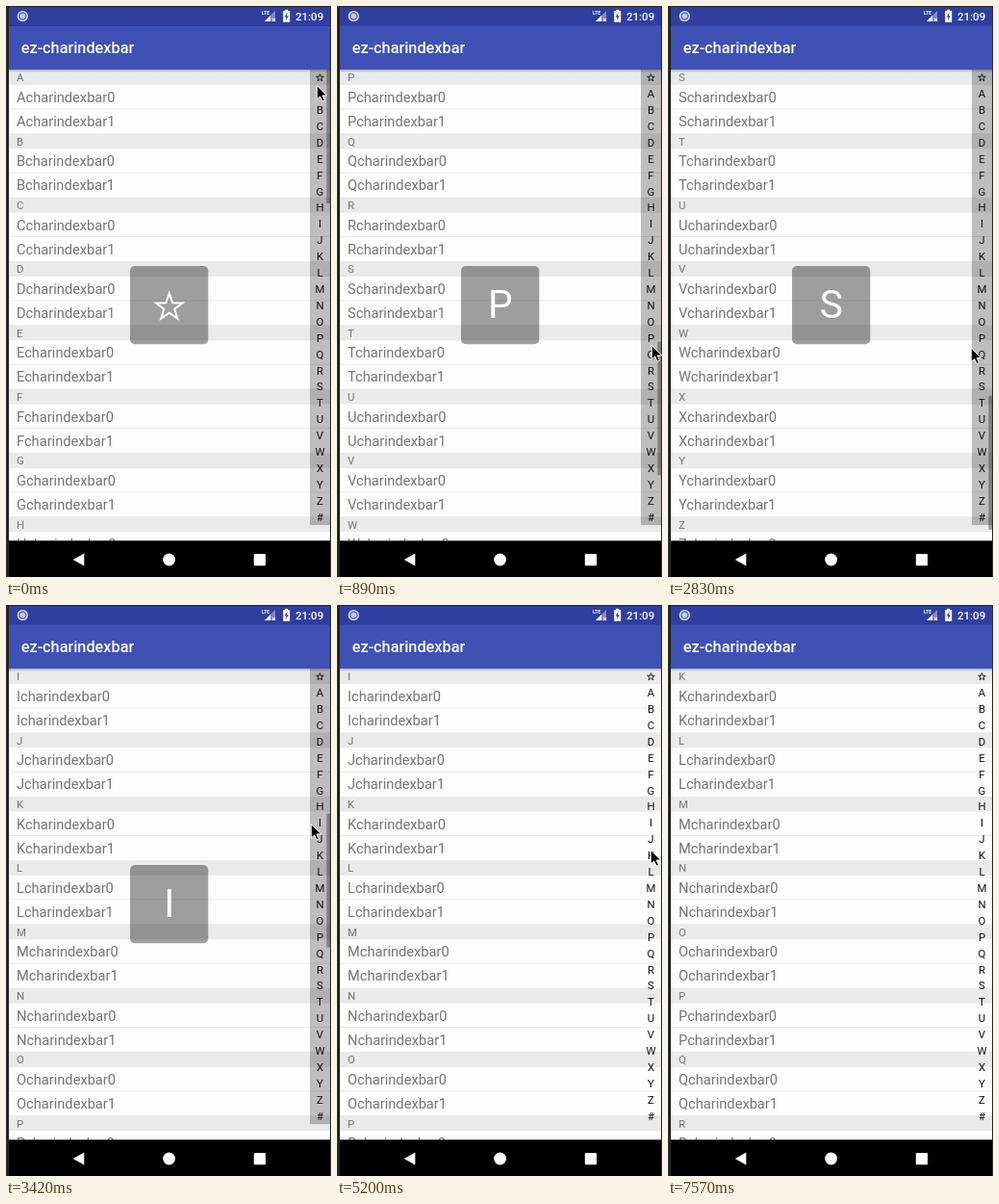
An HTML page with a canvas that plays this animation: 338x593 px, repeating every 7.67 s.

```html
<!DOCTYPE html>
<html lang="en">
<head>
<meta charset="utf-8">
<title>ez-charindexbar</title>
<style>
html, body { margin: 0; height: 100%; overflow: hidden; background: #000; }
canvas { display: block; }
</style>
</head>
<body>
<canvas id="stage" width="338" height="593"></canvas>
<script>
const g = document.getElementById('stage').getContext('2d');
const LOOP = 7670, STEP = 148.5, LAG = 0.8;
const LETTERS = 'ABCDEFGHIJKLMNOPQRSTUVWXYZ';
const TOP = 66, BOTTOM = 555.5, VIEW = BOTTOM - TOP;
const SECTION = 66.32, HEADER = 16, ROW = 25.16;
const CONTENT = SECTION * LETTERS.length;
const BAR_TOP = 65.6, CELL = 16.91;

// Times in steps: release of the drag, tap on K, its release, pointer gone
const DROP = 25, TAP = 38, LIFT = 42, GONE = 46;

// Eased pointer moves; it rests between them
const MOVES = [
  { from: 0, to: 6, x: 327, y: 352 },
  { from: 6, to: 8, x: 327, y: 385 },
  { from: 9, to: 13, x: 322, y: 478 },
  { from: 13, to: 15, x: 313, y: 482 },
  { from: 15, to: 23, x: 317, y: 227 },
  { from: 24, to: 31, x: 326, y: 254 },
  { from: 41, to: GONE, x: 332, y: 580 }
];

const clamp = (v, lo, hi) => Math.min(hi, Math.max(lo, v));
const smooth = f => f * f * (3 - 2 * f);

function pointer(k) {
  let x = 323, y = 82;
  for (const m of MOVES) {
    const f = smooth(clamp((k - m.from) / (m.to - m.from), 0, 1));
    x += (m.x - x) * f;
    y += (m.y - y) * f;
  }
  return { x, y };
}

const cellAt = k => Math.floor((pointer(k - LAG).y - BAR_TOP) / CELL);

function rect(x, y, w, h, color) {
  g.fillStyle = color;
  g.fillRect(x, y, w, h);
}

function roundRect(x, y, size, r, color) {
  g.beginPath();
  g.roundRect(x, y, size, size, r);
  g.fillStyle = color;
  g.fill();
}

function disc(x, y, r, color) {
  roundRect(x - r, y - r, 2 * r, r, color);
}

function text(str, x, y, size, color, align = 'left', weight = 400) {
  g.font = `${weight} ${size}px Roboto, sans-serif`;
  g.textAlign = align;
  g.fillStyle = color;
  g.fillText(str, x, y);
}

function poly(points, fill, stroke, width = 1) {
  g.beginPath();
  points.forEach(([x, y]) => g.lineTo(x, y));
  g.closePath();
  g.fillStyle = fill;
  g.fill();
  if (!stroke) return;
  g.lineWidth = width;
  g.strokeStyle = stroke;
  g.stroke();
}

function star(x, y, r, width, color) {
  const points = Array.from({ length: 10 }, (_, i) => {
    const a = i * Math.PI / 5, d = i % 2 ? r * 0.4 : r;
    return [x + d * Math.sin(a), y - d * Math.cos(a)];
  });
  poly(points, 'transparent', color, width);
}

function drawList(scroll) {
  rect(3, TOP, 334, VIEW, '#fdfdfd');
  [...LETTERS].forEach((c, i) => {
    const y = TOP + i * SECTION - scroll;
    if (y > BOTTOM || y + SECTION < TOP) return;
    rect(3, y, 334, HEADER, '#eaeaea');
    text(c, 11, y + 12.3, 11.4, '#757575');
    for (let n = 0; n < 2; n++) {
      text(c + 'charindexbar' + n, 11, y + HEADER + n * ROW + 18, 14.65, '#747474');
    }
    rect(3, y + HEADER + ROW - 0.6, 334, 0.8, '#e6e6e6');
  });
}

function drawIndex(pressed) {
  if (pressed) rect(316, BAR_TOP, 21, CELL * 28, 'rgba(0,0,0,.25)');
  star(326.5, 74.6, 4, 0.9, '#111');
  [...LETTERS + '#'].forEach((c, i) =>
    text(c, 326.5, 95.1 + i * CELL, 11.4, '#111', 'center'));
}

function drawPopup(cell) {
  roundRect(129, 270, 81.3, 5, 'rgba(0,0,0,.376)');
  if (cell) text((LETTERS + '#')[cell - 1], 169.8, 324.4, 40.7, '#fff', 'center');
  else star(169.8, 312.9, 14.5, 2, '#fff');
}

function drawBars() {
  rect(0, 0, 338, 20.5, '#303f9f');
  rect(0, 20.5, 338, TOP - 20.5, '#3f51b5');
  const shade = g.createLinearGradient(0, TOP, 0, TOP + 3);
  shade.addColorStop(0, 'rgba(0,0,0,.28)');
  shade.addColorStop(1, 'rgba(0,0,0,0)');
  rect(3, TOP, 334, 3, shade);
  text('ez-charindexbar', 15.8, 49, 16.3, '#fff', 'left', 500);

  // status icons
  disc(17.3, 10.5, 5.6, '#e4e7f6');
  disc(17.3, 10.5, 4.3, '#5c6bc0');
  disc(17.3, 10.5, 2.8, '#c5cae9');
  text('LTE', 266, 9, 5, '#fff', 'left', 700);
  poly([[269, 16], [280, 16], [280, 5]], 'rgba(255,255,255,.4)');
  poly([[269, 16], [275, 16], [275, 10]], '#fff');
  text('×', 278.6, 17, 8, '#fff', 'center', 700);
  rect(288.2, 5, 7, 11.8, '#fff');
  rect(290.2, 3.8, 3, 1.5, '#fff');
  poly([[292.4, 6.8], [289.7, 11.4], [291.4, 11.4], [291, 15],
    [293.8, 10.2], [292.1, 10.2]], '#303f9f');
  text('21:09', 301, 14.8, 11.5, '#fff', 'left', 500);

  // navigation buttons
  rect(0, BOTTOM, 338, 38, '#000');
  poly([[69.7, 575], [81.3, 568.6], [81.3, 581.4]], '#fff');
  disc(169.6, 575, 6.4, '#fff');
  roundRect(257.8, 569, 12.2, 1, '#fff');

  // window edges
  rect(0, 0, 338, 1, '#242428');
  rect(0, 0, 3, 593, '#242428');
  rect(337, 0, 1, 593, '#242428');
}

function drawPointer({ x, y }) {
  const arrow = [[0, 0], [0, 14.5], [3.4, 11.4], [5.8, 16.6], [8.2, 15.6], [5.9, 10.5], [10.4, 10.4]];
  poly(arrow.map(([dx, dy]) => [x + dx + 0.3, y + dy + 0.5]), '#000', '#fff');
}

function draw(time) {
  const k = Math.floor((time % LOOP + 12) / STEP);
  const pressed = k < DROP || (k >= TAP && k < LIFT);
  const cell = k < TAP ? cellAt(Math.min(k, DROP - 1)) : cellAt(TAP);
  const scroll = Math.min(Math.max(0, cell - 1) * SECTION, CONTENT - VIEW);

  // the scroll thumb fades some time after the list last moved
  const idle = k < TAP ? k - 23 : k - TAP;
  const thumb = 0.33 * clamp((12 - idle) / 2, 0, 1);

  drawList(scroll);
  rect(333.4, TOP + scroll * VIEW / CONTENT, 3.6, VIEW * VIEW / CONTENT, `rgba(0,0,0,${thumb})`);
  drawIndex(pressed);
  if (pressed) drawPopup(cell);
  drawBars();
  if (k < GONE) drawPointer(pointer(k));
}

let start;
function tick(now) {
  start ??= now;
  draw(now - start);
  requestAnimationFrame(tick);
}
requestAnimationFrame(tick);
</script>
</body>
</html>
```
